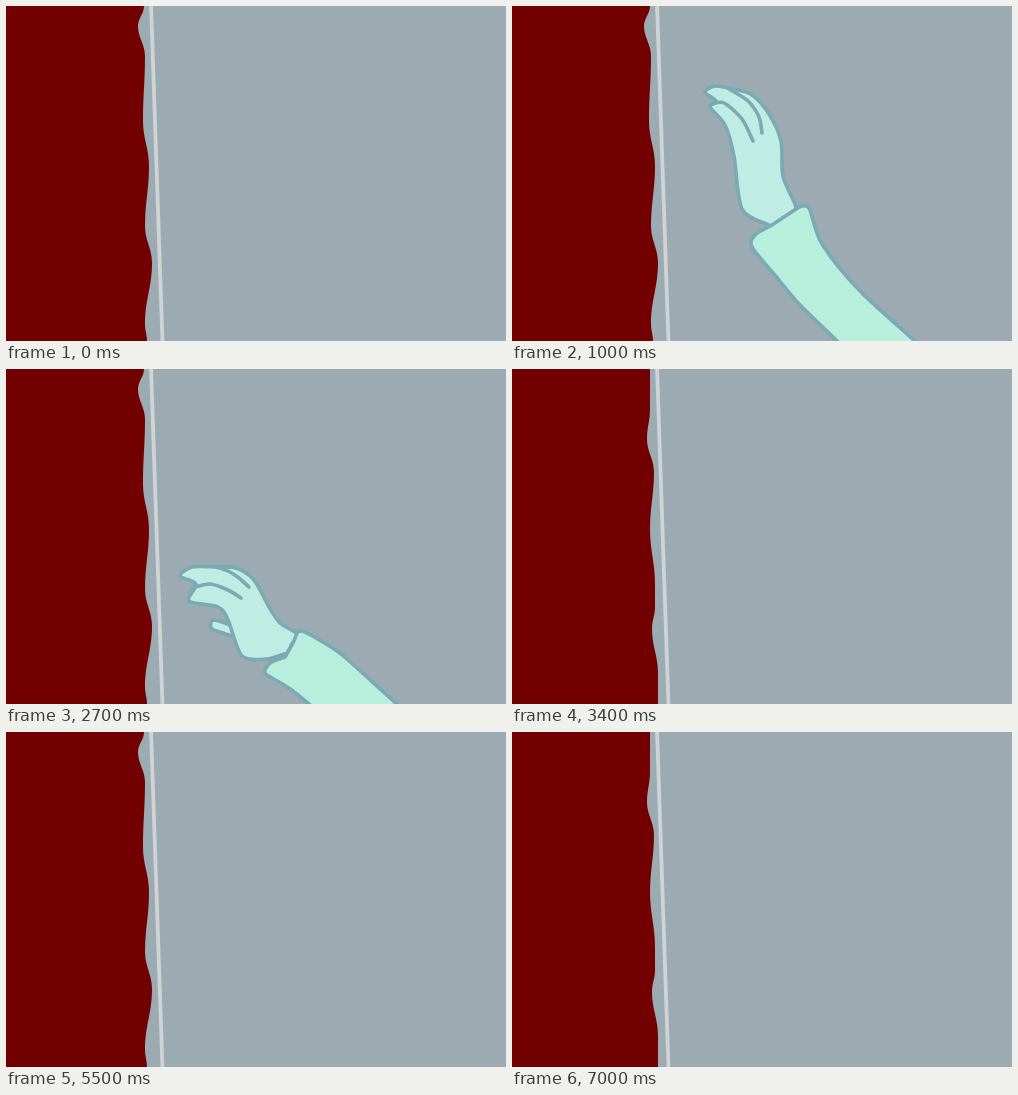
These frames come from a looping animation (500x335 px, 7100 ms). An HTML page:

```html
<!DOCTYPE html>
<html lang="en">
<head>
<meta charset="utf-8">
<title>Hand on the wall</title>
<style>
  html, body { margin: 0; width: 100%; height: 100%; overflow: hidden; background: #9caab2; }
  svg { display: block; width: 100vw; height: 100vh; }
  #arm path { stroke: #7ba9b4; stroke-width: 3.6; stroke-linecap: round; stroke-linejoin: round; }
  #thumb, #hand { fill: #bfece3; }
  #sleeve { fill: #b8eedc; }
  #lowCrease, #highCrease { fill: none; }
</style>
</head>
<body>
<svg viewBox="0 0 500 335">
  <rect width="500" height="335" fill="#9caab2"/>
  <path id="wall" fill="#720000"/>
  <path d="M145 -2L156.5 337" stroke="#d0d3d3" stroke-width="3.8"/>
  <g id="arm">
    <path id="thumb"/><path id="hand"/>
    <path id="lowCrease"/><path id="highCrease"/>
    <path id="sleeve"/>
  </g>
</svg>
<script>
const LOOP = 7100, STEP = 100, PAUSED_STEP = 12;

const parse = text => text.split(' ').map(p => p.split(',').map(Number));

// Turning points of each torn edge, top to bottom
const EDGES = {
  wavy: '138,0 132,20 139,50 137,115 143,160 139,220 146,257 139,318 141,335',
  pushed: '131.5,0 131.5,42 138.5,80 136.5,110 140,155 137,226 142,240 144,295 144,335',
  bumpy: '138,0 138,40 135,70 142,103 138,160 143,215 143,238 140,260 146,304 146,335'
};

// Matching points in every pose, so that poses can be blended
const POSES = {
  reach: {
    thumb: '242,185 238,178 238,170 242,163',
    hand: '270,225 257,219 230,203 222,150 213,119 198,101 204,95 193,86 203,80 221,83 240,89 257,108 269,135 271,170 284,201 282,212',
    lowCrease: '200,98 212,97 230,113 241,135',
    highCrease: '217,83 236,95 247,111 250,127',
    sleeve: '287,201 297,202 310,238 350,287 470,402 400,412 325,335 288,299 262,268 240,241 243,229 260,219'
  },
  press: {
    thumb: '180,170 175,163 175,155 180,148',
    hand: '196,198 178,199 161,185 153,158 156,128 151,95 154,80 151,70 159,61 170,70 181,72 193,90 206,123 202,155 213,180 211,190',
    lowCrease: '154,82 161,80 170,100 178,120',
    highCrease: '169,69 178,85 186,102 193,119',
    sleeve: '213,181 222,178 243,236 273,273 400,414 330,414 246,335 205,293 187,263 170,213 176,201 200,189'
  },
  lower: {
    thumb: '226,267 206,260 207,251 222,255',
    hand: '278,285 261,290 236,287 222,251 212,238 183,232 190,215 174,207 186,198 210,198 230,199 248,211 263,238 274,254 291,265 285,276',
    lowCrease: '186,219 204,215 222,221 235,229',
    highCrease: '210,198 222,202 233,209 243,218',
    sleeve: '288,272 294,262 315,272 350,298 470,415 400,415 303,335 287,322 273,313 259,304 264,294 279,288'
  }
};
for (const pose of Object.values(POSES))
  for (const part in pose) pose[part] = parse(pose[part]);

const settle = p => 1 - (1 - p) ** 1.2;
const linear = p => p;
const smooth = p => p * p * (3 - 2 * p);
const accelerate = p => p * p;

// Each key is reached from the one before with its own easing
const KEYS = [
  { beat: 4, pose: 'reach', shift: [340, 120] },
  { beat: 10, pose: 'reach', ease: settle },
  { beat: 12, pose: 'press', ease: linear },
  { beat: 22, pose: 'press', ease: linear },
  { beat: 26, pose: 'lower', ease: smooth },
  { beat: 31, pose: 'lower', shift: [190, 150], ease: accelerate }
];

const el = id => document.getElementById(id);

// Catmull-Rom spline through the points
function spline(pts) {
  const at = i => pts[Math.max(0, Math.min(pts.length - 1, i))];
  let d = 'M' + pts[0];
  for (let i = 0; i < pts.length - 1; i++) {
    const [a, b, c, e] = [at(i - 1), at(i), at(i + 1), at(i + 2)];
    const lead = b.map((v, k) => v + (c[k] - a[k]) / 7);
    const trail = c.map((v, k) => v - (e[k] - b[k]) / 7);
    d += `C${lead} ${trail} ${c}`;
  }
  return d;
}

// Swings vertically through each turning point
function tornEdge(pts) {
  let d = 'M0 335L0 0L' + pts[0];
  for (let i = 1; i < pts.length; i++) {
    const [[x0, y0], [x1, y1]] = [pts[i - 1], pts[i]];
    const reach = (y1 - y0) * 0.4;
    d += `C${x0} ${y0 + reach} ${x1} ${y1 - reach} ${x1} ${y1}`;
  }
  return d + 'Z';
}

function drawArm(beat) {
  const next = KEYS.findIndex(key => key.beat > beat);
  el('arm').setAttribute('display', next > 0 ? 'inline' : 'none');
  if (next < 1) return;
  const from = KEYS[next - 1], to = KEYS[next];
  const p = to.ease((beat - from.beat) / (to.beat - from.beat));
  const place = (key, pt, k) => pt[k] + (key.shift ? key.shift[k] : 0);
  for (const part in POSES[from.pose]) {
    const target = POSES[to.pose][part];
    const pts = POSES[from.pose][part].map((pt, i) => [0, 1].map(k =>
      place(from, pt, k) * (1 - p) + place(to, target[i], k) * p));
    el(part).setAttribute('d', spline(pts) + (part === 'sleeve' ? 'Z' : ''));
  }
}

function drawWall(beat) {
  const pressing = beat >= 12 && beat <= 22;
  const edge = beat % 2 ? 'bumpy' : pressing ? 'pushed' : 'wavy';
  el('wall').setAttribute('d', tornEdge(parse(EDGES[edge])));
}

function render(time) {
  const step = Math.floor((time % LOOP) / STEP);
  const beat = step < PAUSED_STEP ? step : step - 1;
  drawWall(beat);
  drawArm(beat);
}

const start = performance.now();
function tick() {
  render(performance.now() - start);
  requestAnimationFrame(tick);
}
tick();
</script>
</body>
</html>
```
